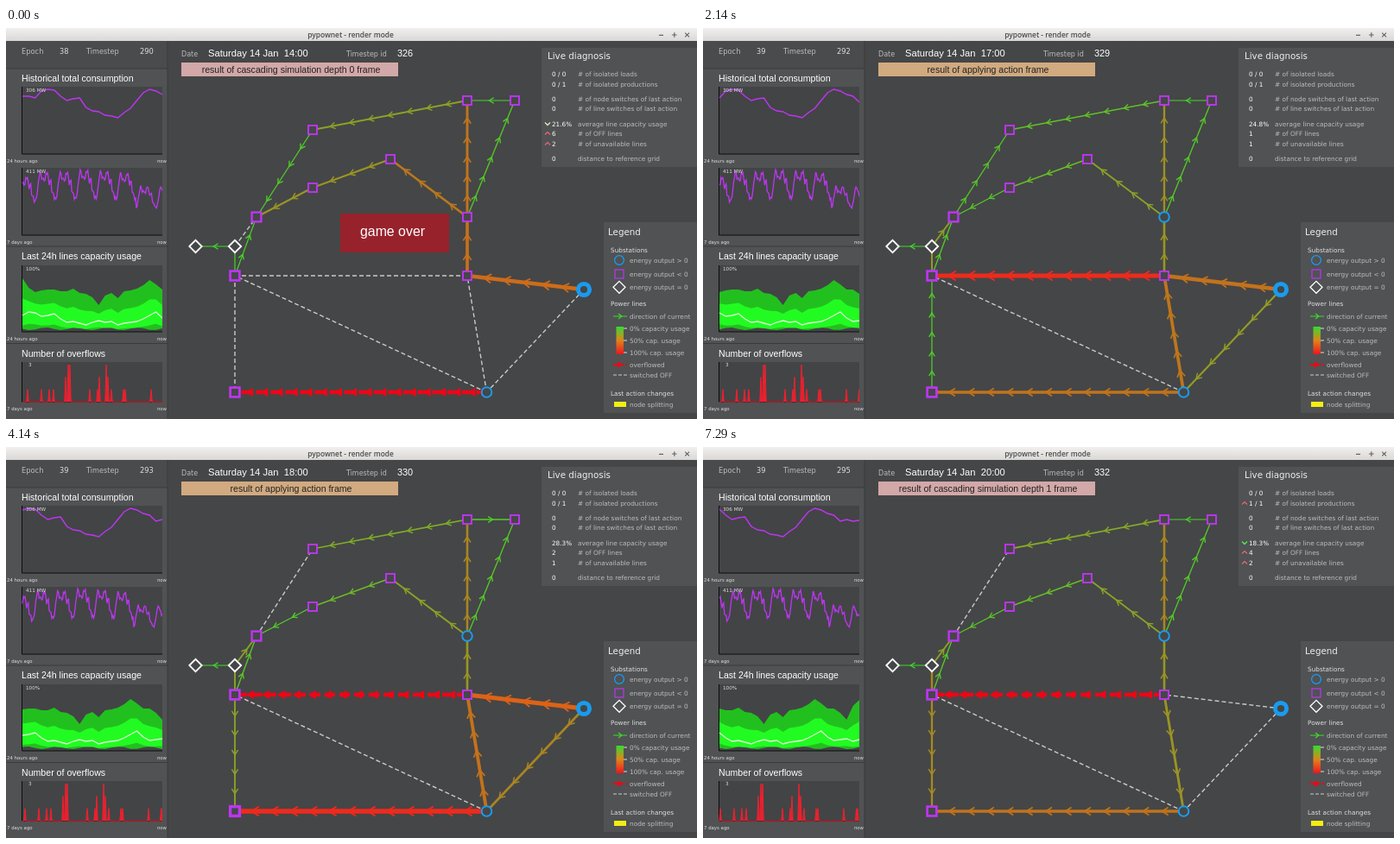
Animation, 800 px wide and 453 px high, one loop 8000 ms. Source, as an HTML page:

```html
<!DOCTYPE html>
<html lang="en">
<head>
<meta charset="utf-8">
<title>pypownet - render mode</title>
<style>
  html, body { margin: 0; width: 100%; height: 100%; overflow: hidden; background: #454647; }
  svg { display: block; width: 800px; height: 453px; }
  text { font-family: "DejaVu Sans", sans-serif; white-space: pre; }
  .sans { font-family: "Liberation Sans", Arial, sans-serif; }
  .bar { font-family: "Open Sans", sans-serif; font-weight: 600; }
</style>
</head>
<body>
<svg viewBox="0 0 800 453" xmlns="http://www.w3.org/2000/svg">
  <defs>
    <linearGradient id="titleFill" x2="0" y2="1"><stop stop-color="#f1f0ef"/><stop offset="1" stop-color="#d9d8d6"/></linearGradient>
    <linearGradient id="scaleFill" x2="0" y2="1"><stop stop-color="#32dc32"/><stop offset=".5" stop-color="#e08418"/><stop offset="1" stop-color="#f01420"/></linearGradient>
    <clipPath id="plotArea"><rect x="18" y="60" width="163" height="380"/></clipPath>
  </defs>
  <g id="base"></g>
  <g id="live"></g>
</svg>
<script>
(() => {
const LOOP = 8000;
const PURPLE = '#bd35f3', BLUE = '#1a9bee', WHITE = '#ffffff', BG = '#454647', PANEL = '#505254', RED = '#f00516';

// ---------- drawing helpers ----------
const rect = (x, y, w, h, fill, more = '') => `<rect x="${x}" y="${y}" width="${w}" height="${h}" fill="${fill}" ${more}/>`;
const path = (d, stroke, w, more = '') => `<path d="${d}" fill="none" stroke="${stroke}" stroke-width="${w}" ${more}/>`;
const text = (x, y, s, size, fill, more = '') => `<text x="${x}" y="${y}" font-size="${size}" fill="${fill}" ${more}>${s}</text>`;
const sans = (x, y, s, size, fill, more = '') => text(x, y, s, size, fill, 'class="sans" ' + more);
const poly = pts => 'M' + pts.map(p => p[0].toFixed(1) + ' ' + p[1].toFixed(1)).join('L');
const MIDDLE = 'text-anchor="middle"', END = 'text-anchor="end"';

// ---------- network ----------
const NODES = {
  A: [219.5, 253], B: [265, 253], C: [290, 219], D: [355, 118], E: [355, 185], F: [445, 152], G: [534, 84],
  H: [589, 84], I: [534, 219], J: [534, 287], K: [265, 287], L: [265, 422], M: [556.5, 422], N: [669, 303]
};
const EDGES = 'BA BC KB KC CD EC FE IF GD HG IH IG JI NJ MJ NM JK MK KL ML'.split(' ');
// how fast a line thickens with its load
const GROWTH = { IG: 3.5, JI: 4.6, NJ: 6, MJ: 5, NM: 3.5, JK: 4.3, ML: 4.5 };
// load in percent per edge; minus = reversed, x = switched off, o = overflowed
const FLOWS = {
  lost: '0 x -4 3 -6 34 34 50 27 4 8 53 56 60 x x x x x o',
  full: '0 30 32 8 6 8 14 24 10 4 8 36 33 40 42 32 46 76 4 38',
  cut: '0 28 32 8 8 8 14 26 12 4 8 36 34 55 52 30 95 x -6 54',
  over: '0 26 28 10 x 6 16 28 22 -6 8 42 34 68 55 42 o x 26 95',
  mid: '0 24 28 10 x 6 14 24 22 4 8 42 34 64 54 38 o x 16 80',
  calm: '0 20 28 8 x -5 12 20 24 4 8 42 34 58 52 32 95 x 6 62',
  split: '0 28 42 8 x 10 14 26 24 4 8 42 34 x -35 x o x 40 54'
};
const STOPS = [[60, 220, 40], [135, 165, 40], [185, 120, 30], [235, 90, 20], [240, 30, 30]];

function loadColor(load) {
  const p = Math.min(load, .999) * 4, i = Math.floor(p);
  return `rgb(${STOPS[i].map((c, n) => Math.round(c + (STOPS[i + 1][n] - c) * (p - i)))})`;
}

function arrowHeads(a, b, color, w, solid) {
  const dx = b[0] - a[0], dy = b[1] - a[1], len = Math.hypot(dx, dy);
  const n = Math.floor(solid ? len / 18 : len / 23 - .5), turn = Math.atan2(dy, dx) * 180 / Math.PI;
  const s = solid ? 5 : 2.6 + w * .55;
  let out = '';
  for (let i = 1; i <= n; i++) {
    const t = i / (n + 1);
    const place = `transform="translate(${(a[0] + dx * t).toFixed(1)} ${(a[1] + dy * t).toFixed(1)}) rotate(${turn.toFixed(1)})"`;
    out += solid ? `<path d="M5 0L-4 ${-s}V${s}z" fill="${color}" ${place}/>`
                 : path(`M${-s} ${-s}L${s * .6} 0L${-s} ${s}`, color, 1.2 + w * .12, place);
  }
  return out;
}

function edge(name, value) {
  let a = NODES[name[0]], b = NODES[name[1]];
  if (value === 'x') return path(poly([a, b]), '#c9c9c9', 1.4, 'stroke-dasharray="5 3"');
  if (value === 'o') return path(poly([a, b]), RED, 4.4, 'stroke-dasharray="12 5"') + arrowHeads(a, b, RED, 5, true);
  if (value < 0) [a, b] = [b, a];
  const load = Math.abs(value) / 100, color = loadColor(load), w = 1.1 + load * (GROWTH[name] || 3);
  return path(poly([a, b]), color, w.toFixed(2)) + arrowHeads(a, b, color, w, false);
}

const circle = (x, y, r, w, fill = BG) => `<circle cx="${x}" cy="${y}" r="${r}" fill="${fill}" stroke="${BLUE}" stroke-width="${w}"/>`;
const square = (x, y, h, w, fill = BG) => rect(x - h, y - h, 2 * h, 2 * h, fill, `stroke="${PURPLE}" stroke-width="${w}"`);
const diamond = (x, y, h, w, fill = BG) => `<path d="M${x - h} ${y}l${h} ${-h}l${h} ${h}l${-h} ${h}z" fill="${fill}" stroke="${WHITE}" stroke-width="${w}"/>`;

function node(name, flow) {
  const [x, y] = NODES[name];
  if ('AB'.includes(name)) return diamond(x, y, 7.2, 1.8);
  if (name === 'N') return circle(x, y, 6.6, 5);
  if (name === 'M' || (name === 'I' && flow !== 'lost')) return circle(x, y, 5.8, 2);
  const wide = { C: 2.4, K: 2.7, L: flow === 'over' ? 3.4 : 2.7 }[name];
  return square(x, y, wide ? 5.4 : 5, wide || 1.9);
}

function network(flow) {
  const loads = FLOWS[flow].split(' ');
  return EDGES.map((e, i) => edge(e, loads[i])).join('') + Object.keys(NODES).map(n => node(n, flow)).join('');
}

// ---------- side charts: hourly series that slide left by one step ----------
const DAY = 23, STEP = 162 / (DAY - 1);
const USE = [79, 79, 81, 73, 71, 72, 79, 84, 82, 81, 92, 96, 97, 101, 102, 104, 98, 93, 84, 75, 71, 73, 77, 79, 86, 84, 86, 85];
const HIGH = [290, 301, 306, 304, 303, 303, 305, 305, 302, 307, 308, 312, 321, 310, 307, 313, 305, 304, 302, 298, 292, 297, 303, 303, 308, 316, 300, 293];
const MEAN = [333, 329, 330, 334, 333, 331, 337, 341, 340, 342, 344, 341, 339, 341, 340, 344, 342, 341, 340, 337, 333, 329, 336, 340, 339, 338, 341, 339];
const WEEKDAY = [1.28, 1.32, 1.34, 1.3, 1.3, 1.2, 1.2];
// place and number of simultaneous overflows
const SPIKES = [[25, 1], [41, 1], [50, 1], [55, 1], [69, 2], [72, 3], [74, 3], [97, 1], [106, 1], [108, 2], [116, 3],
  [118, 2], [122, 1], [136, 1], [138, 1], [168, 1], [182.6, 1], [184, 1]];

const dayLine = (shift, y) => Array.from({ length: DAY }, (_, i) => [19 + i * STEP, y(i + shift)]);

function weekLine(shift) {
  return Array.from({ length: 168 }, (_, i) => {
    const k = i - 167 + DAY - 1 + shift, day = Math.floor((k - 15) / 24);
    const use = (146 - (k < 0 ? USE[(k + 240) % 24] : USE[k])) / 75;
    const gain = day < -1 ? WEEKDAY[-2 - day] : 1;
    const wobble = k < 0 ? 2 * Math.sin(k * 2.1) : 0;
    return [19 + i * 162 / 167, 240 - use * gain * 306 / 411 * 75 + wobble];
  });
}

const band = (shift, upper, lower, fill) =>
  `<path d="${poly([...dayLine(shift, upper), ...dayLine(shift, lower).reverse()])}z" fill="${fill}"/>`;

const high = k => HIGH[k], mean = k => MEAN[k];
const low = k => 348.5 + 1.6 * Math.sin(k * 1.3);
const innerHigh = k => high(k) * .45 + mean(k) * .55;
const innerLow = k => mean(k) + (352 - mean(k)) * .6;

function charts(shift) {
  const spikes = SPIKES.map(([x, n]) => `H${x - shift - 1.2}L${x - shift} ${433 - n * 14.3}L${x - shift + 1.2} 433`).join('');
  return '<g clip-path="url(#plotArea)">' +
    path(poly(dayLine(shift, k => USE[k])), PURPLE, 1.4) +
    path(poly(weekLine(shift)), PURPLE, 1.3) +
    band(shift, high, low, '#22c01e') +
    band(shift, innerHigh, innerLow, '#22fb22') +
    path(poly(dayLine(shift, mean)), '#d8ffd0', 1.3) +
    `<path d="M19 433${spikes}H181" fill="#e2202e" stroke="#f0202e" stroke-width="1"/>` + '</g>' +
    text(23, 74, '306 MW', 5.7, '#ddd') + text(23, 168, '411 MW', 5.7, '#ddd') +
    text(23, 281, '100%', 5.7, '#ddd') + text(26, 392, '3', 5.7, '#ddd');
}

// ---------- static parts ----------
function sidebar() {
  let out = rect(0, 15, 187, 438, '#4a4b4d') + rect(0, 47, 187, 406, PANEL) + rect(186.5, 15, 1, 438, '#3b3c3d');
  for (const y of [47, 253, 365.5]) out += rect(0, y - .5, 187, 1, '#3a3b3c');
  for (const [y, end, ago] of [[68, 146, '24 hours ago'], [162, 240, '7 days ago'], [275, 352, '24 hours ago'], [387, 433, '7 days ago']]) {
    out += rect(18.5, y, 162.5, end - y, '#434446') + path(`M18.5 ${y}V${end}H181`, '#0c0c0c', 1) +
      text(1, end + 9.8, ago, 5.4, '#ddd') + text(186, end + 9.8, 'now', 5.4, '#ddd', END);
  }
  const heads = [[61.7, 'Historical total consumption'], [268, 'Last 24h lines capacity usage'], [380.7, 'Number of overflows']];
  return out + heads.map(([y, s]) => sans(18, y, s, 10.6, WHITE)).join('') +
    text(18, 30, 'Epoch', 8.3, '#bbb') + text(93, 30, 'Timestep', 8.2, '#bbb');
}

const ROWS = [[53, '# of isolated loads'], [65, '# of isolated productions'], [82, '# of node switches of last action'],
  [93, '# of line switches of last action'], [111, 'average line capacity usage'], [122, '# of OFF lines'],
  [134, '# of unavailable lines'], [151, 'distance to reference grid']];

function diagnosis() {
  return rect(620, 23, 180, 138, PANEL) + text(627, 35.5, 'Live diagnosis', 10.3, '#eee') +
    ROWS.map(([y, s]) => text(662, y + 2.7, s, 7.35, '#bcbcbc')).join('');
}

function legend() {
  const labels = [[269, 'energy output &gt; 0'], [285, 'energy output &lt; 0'], [300, 'energy output = 0'], [334, 'direction of current'],
    [348, '0% capacity usage'], [362, '50% cap. usage'], [376, '100% cap. usage'], [390, 'overflowed'], [402, 'switched OFF'], [436, 'node splitting']];
  const heads = [[257, 'Substations'], [319, 'Power lines'], [423, 'Last action changes']];
  return rect(692, 225, 108, 221, PANEL) + text(697, 240, 'Legend', 10.3, '#eee') +
    labels.map(([y, s]) => text(722, y + 2.7, s, 7.35, '#bcbcbc')).join('') +
    heads.map(([y, s]) => text(700, y + 2.5, s, 7.3, '#ddd')).join('') +
    circle(710, 269, 5.4, 1.3, PANEL) + square(710, 285, 5, 1.2, PANEL) + diamond(710, 300.3, 7, 1.3, PANEL) +
    path('M703 334H719M709 331l4 3l-4 3', '#3cdc28', 1.2) +
    rect(706.5, 346, 8.5, 32, 'url(#scaleFill)') + path('M715 348h4M715 362h4M715 376h4', '#ddd', 1) +
    path('M703 390H719', RED, 2, 'stroke-dasharray="5 2"') + `<path d="M708 386.5l7 3.5l-7 3.5z" fill="${RED}"/>` +
    path('M703 402H719', '#c9c9c9', 1.2, 'stroke-dasharray="4 2"') + rect(704, 433, 14, 6, '#f2ee12');
}

function windowBar() {
  return rect(0, 0, 800, 15, 'url(#titleFill)') + text(399, 10.8, 'pypownet - render mode', 8.4, '#4a4a4a', `class="bar" ${MIDDLE}`) +
    path('M756 8.3h5M771 8h5.6M773.8 5.2v5.6M786.2 5.6l4.8 4.8M791 5.6l-4.8 4.8', '#666', 1.2);
}

// ---------- scenes ----------
const BANNERS = {
  fresh: ['new observation frame', '#afdeae'],
  apply: ['result of applying action frame', '#d1aa80'],
  depth0: ['result of cascading simulation depth 0 frame', '#d3a8a8'],
  depth1: ['result of cascading simulation depth 1 frame', '#d3a8a8']
};
// start, banner, step, flow, usage, OFF lines, unavailable lines, trend per row
const SCENES = [
  [0, 'depth0', 0, 'lost', '21.6', 6, 2, '....duu.'],
  [140, 'fresh', 1, 'full', '22.1', 0, 0, '....udd.'],
  [860, 'apply', 1, 'full', '22.1', 0, 0, '........'],
  [1570, 'fresh', 2, 'cut', '24.8', 1, 1, '....uuu.'],
  [2140, 'apply', 2, 'cut', '24.8', 1, 1, '........'],
  [2710, 'depth1', 2, 'over', '28.3', 2, 1, '....uu..'],
  [3570, 'fresh', 3, 'over', '28.3', 2, 1, '....uu..'],
  [4000, 'apply', 3, 'over', '28.3', 2, 1, '........'],
  [4860, 'fresh', 4, 'mid', '26.7', 2, 1, '....d...'],
  [5290, 'apply', 4, 'mid', '26.7', 2, 1, '........'],
  [6140, 'fresh', 5, 'calm', '24.3', 2, 0, '....d.d.'],
  [6710, 'apply', 5, 'calm', '24.3', 2, 0, '........'],
  [7140, 'depth1', 5, 'split', '18.3', 4, 2, '.u..duu.']
];

function trend(kind, y, pale) {
  if (kind === 'u') return path(`M624 ${y + 1.5}l3 -3l3 3`, '#ea6870', 1.2);
  if (kind === 'd') return path(`M624 ${y - 1.5}l3 3l3 -3`, pale ? '#e6e8b4' : '#52f04a', 1.3);
  return '';
}

function scene([, banner, step, flow, usage, off, gone, trends]) {
  const [label, color] = BANNERS[banner];
  const values = ['0 / 0', flow === 'split' ? '1 / 1' : '0 / 1', 0, 0, usage + '%', off, gone, 0];
  const hour = step ? 15 + step : 14;
  return charts(step) +
    text(62, 30, step ? 39 : 38, 8.2, '#ddd') + text(155, 30, 290 + step, 8.3, '#ddd') +
    sans(234, 33, `Saturday 14 Jan  ${hour}:00`, 11.2, WHITE) + sans(453, 33, 312 + hour, 10.9, WHITE) +
    rect(203, 40, 251, 16, color) + sans(330, 51.6, label, 10.57, '#222', MIDDLE) +
    ROWS.map(([y], i) => text(632, y + 2.7, values[i], 7.25, WHITE) + trend(trends[i], y, flow === 'lost')).join('') +
    network(flow) +
    (flow === 'lost' ? rect(387, 215, 126, 45, '#97222c') + sans(447.5, 241, 'game over', 15.9, WHITE, MIDDLE) : '');
}

document.getElementById('base').innerHTML = rect(0, 0, 800, 453, BG) + sidebar() + diagnosis() + legend() + windowBar() +
  text(203, 33, 'Date', 8, '#bbb') + text(394, 33, 'Timestep id', 8, '#bbb');

const live = document.getElementById('live');
const begin = performance.now();
let shown = -1;

function update(now) {
  const t = Math.max(0, now - begin) % LOOP;
  let i = SCENES.length - 1;
  while (SCENES[i][0] > t) i--;
  if (i !== shown) live.innerHTML = scene(SCENES[shown = i]);
  requestAnimationFrame(update);
}
update(begin);
})();
</script>
</body>
</html>
```
